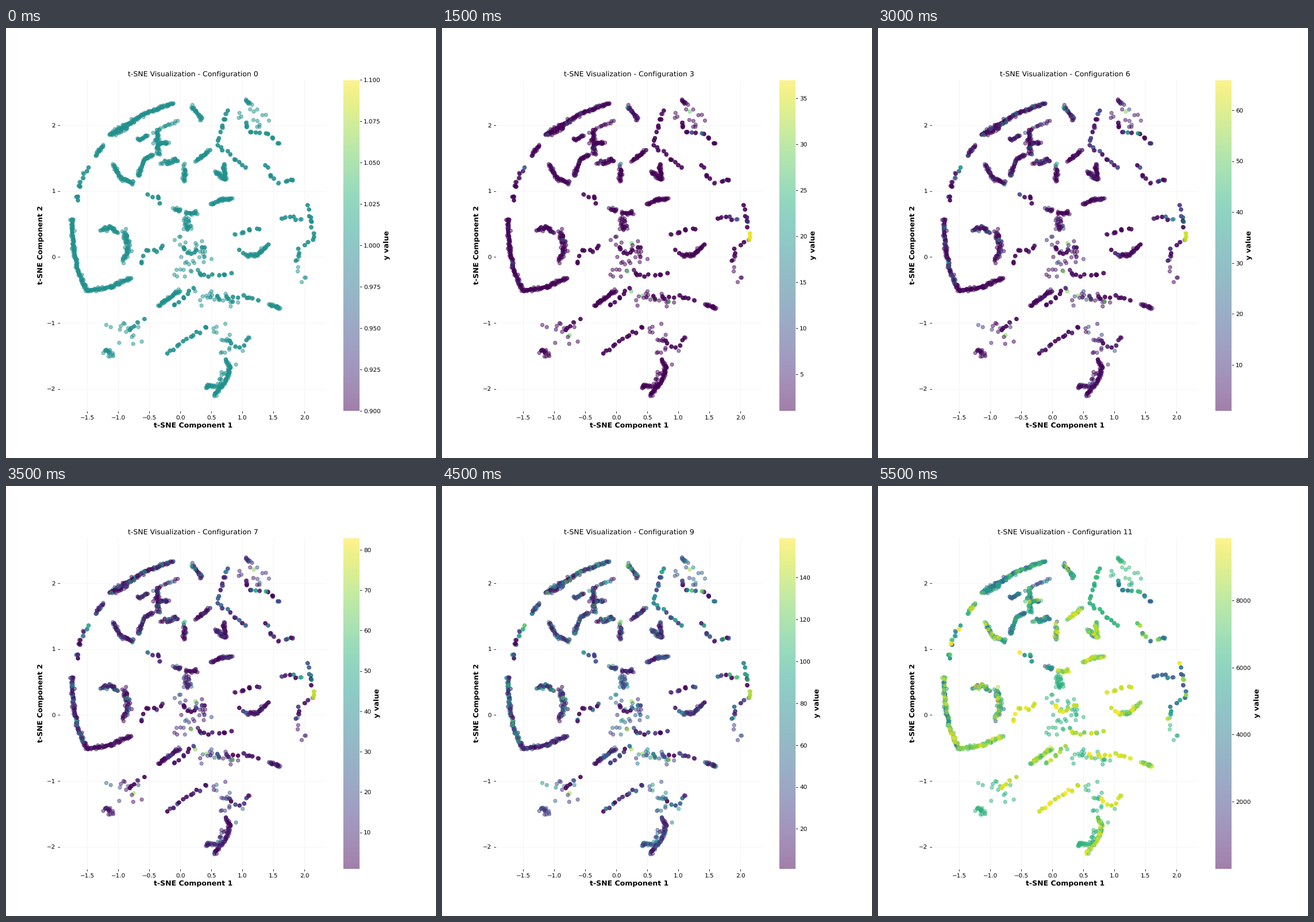
A matplotlib script for the animation above (6000 ms loop, 748 by 748 pixels).

```python
import numpy as np
import matplotlib.pyplot as plt
from matplotlib.animation import FuncAnimation

plt.rcParams["text.hinting"] = "none"
plt.rcParams["axes.edgecolor"] = "white"
rng = np.random.default_rng(11)
fig = plt.figure(figsize=(10, 10), dpi=74.8)
FRAMES = 12
TOPS = [1, 31, 34, 37, 44, 54, 66, 83, 110, 159, 300, 9874]

# Ranges of the normalised value in the last configuration
BLUE, COOL, MIX = (.15, .5), (.2, .75), (.2, 1)
GREEN, WARM, GOLD = (.6, .69), (.6, 1), (.88, 1)
samples = []  # x, y, early value, last value, is loose


def trail(tone, points, spacing, spread, stack=1):
    """Samples scattered along a polyline given in stage pixels."""
    px, py = np.array(points, float).T
    length = np.r_[0, np.cumsum(np.hypot(np.diff(px), np.diff(py)))]
    n = max(3, round(length[-1] / spacing))
    at = (np.arange(n) + rng.uniform(size=n)) / n * length[-1]
    x = np.interp(at, length, px) + rng.normal(0, spread, n)
    y = np.interp(at, length, py) + rng.normal(0, spread, n)
    early, last = rng.uniform(size=n), rng.uniform(*tone, n)
    if tone == GREEN:
        early = .4 + .45 * early
    elif tone in (WARM, GOLD):
        early *= .75
    rows = np.column_stack([x, y, early, last, np.full(n, spread > 5)])
    rows = np.repeat(rows, stack, axis=0)
    if stack > 1:
        rows[:, :2] += rng.normal(0, .5, (n * stack, 2))
    samples.extend(rows)


def ridge(tone, *points):
    trail(tone, points, 1, 1.3)


def thick(tone, *points):
    trail(tone, points, 1, 2.5)


def beads(tone, *points):
    trail(tone, points, 7, 1.5, stack=3)


def loose(tone, *points):
    trail(tone, points, 2.8, 9)


# Outer arc, from the top round to the lower left
ridge(COOL, (291, 130), (240, 150), (180, 186))
thick(COOL, (220, 165), (182, 187))
ridge(MIX, (169, 205), (155, 221))
beads(MIX, (144, 239), (128, 270), (122, 306))
ridge(MIX, (115, 331), (118, 388), (125, 422), (142, 459))
ridge(WARM, (142, 457), (185, 450), (217, 434))

# Left side
ridge(MIX, (165, 352), (181, 346), (194, 357))
thick(MIX, (206, 352), (214, 385), (203, 405))
beads(GOLD, (233, 412), (242, 388), (278, 382))
ridge(MIX, (186, 237), (200, 262), (222, 271))
ridge(COOL, (230, 258), (241, 228), (256, 221))

# Upper middle
ridge(BLUE, (229, 196), (247, 187))
thick(COOL, (263, 176), (264, 221))
ridge(MIX, (262, 201), (283, 200))
trail(BLUE, [(265, 175), (299, 161)], 3, 1.3)
thick(COOL, (272, 236), (300, 229))
thick(MIX, (312, 240), (311, 266))
ridge(WARM, (331, 232), (354, 213))
ridge(MIX, (323, 136), (341, 159))
ridge(MIX, (364, 248), (379, 264))
ridge(WARM, (380, 237), (381, 266))
ridge(WARM, (356, 307), (372, 299), (394, 297))

# Upper right
ridge(GREEN, (416, 125), (424, 131))
loose(GREEN, (415, 140), (450, 162))
beads(GREEN, (387, 139), (367, 203), (420, 245))
beads(COOL, (414, 157), (421, 180), (458, 184), (477, 208))
beads(MIX, (450, 238), (471, 269), (505, 263))

# Centre
beads(MIX, (246, 290), (267, 294), (266, 306))
ridge(COOL, (291, 314), (304, 318))
ridge(WARM, (313, 322), (333, 321))
thick(GREEN, (313, 328), (318, 352))
loose(GREEN, (305, 365), (350, 400))
beads(GOLD, (305, 377), (319, 393), (352, 379))
loose(GREEN, (300, 422), (340, 412))
beads(WARM, (329, 427), (370, 431), (394, 426))

# Right side
beads(GOLD, (397, 360), (447, 346))
beads(GOLD, (403, 384), (420, 395))
ridge(WARM, (420, 395), (438, 395), (457, 376))
beads(BLUE, (474, 335), (489, 328), (515, 335))
beads(MIX, (524, 305), (535, 367), (513, 384), (506, 405))
trail(GREEN, [(502, 412), (522, 442)], 6, 4)

# Lower slanted bands
ridge(WARM, (302, 457), (264, 484))
beads(GOLD, (238, 507), (209, 526))
loose(GREEN, (190, 518), (225, 538))
thick(GREEN, (172, 559), (186, 568))
beads(GOLD, (278, 567), (307, 547), (352, 517))
beads(WARM, (289, 486), (331, 451))
loose(GREEN, (335, 467), (400, 475))
beads(GOLD, (365, 470), (415, 465), (440, 474))
ridge(WARM, (457, 481), (478, 487))

# Bottom hook
loose(GREEN, (368, 525), (392, 568))
beads(GOLD, (385, 545), (404, 556), (426, 537))
ridge(WARM, (382, 577), (390, 592), (382, 615), (361, 639))
thick(GREEN, (345, 623), (372, 622))
trail(GREEN, [(379, 595), (371, 615)], 3, 3)

data = np.array(samples)
# Higher final values mostly lie on top
data = data[np.argsort(data[:, 3] + rng.normal(0, .25, len(data)))]
px, py, early, last, is_loose = data.T
X, Y = (px - 303.3) / 107.9, (398.2 - py) / 114.7

# A few loose samples stay high early on; the ones at the right edge are highest
hot = rng.choice(np.flatnonzero(is_loose), 9, replace=False)
hottest = px > px.max() - 2


def level(k):
    """Normalised value of every sample in configuration k."""
    if k == FRAMES - 1:
        return last
    power = 2 + .35 * max(9 - k, 0) ** 2
    value = (.25 + .06 * k) * early ** power
    drift = .017 * (k - 1)
    value[hot] = .71 + drift
    value[hottest] = 1 - drift
    return value


def draw(k):
    fig.clf()
    ax = fig.add_subplot()
    if k == 0:
        low, high, color = .9, 1.1, np.ones_like(X)
    else:
        low, high = 1, TOPS[k]
        color = low + (high - low) * level(k)
    dots = ax.scatter(X, Y, c=color, cmap="viridis", vmin=low, vmax=high, alpha=.5)
    bar = fig.colorbar(dots, ax=ax)
    bar.set_label("y value", fontsize=12, fontweight="bold")
    ax.set(xlim=(-1.944, 2.354), ylim=(-2.332, 2.689),
           title=f"t-SNE Visualization - Configuration {k}")
    ax.set_xlabel("t-SNE Component 1", fontsize=12, fontweight="bold")
    ax.set_ylabel("t-SNE Component 2", fontsize=12, fontweight="bold")
    ax.grid(alpha=.15)


anim = FuncAnimation(fig, draw, frames=FRAMES, init_func=lambda: None,
                     interval=500, repeat=True, repeat_delay=0)
plt.show()
```
